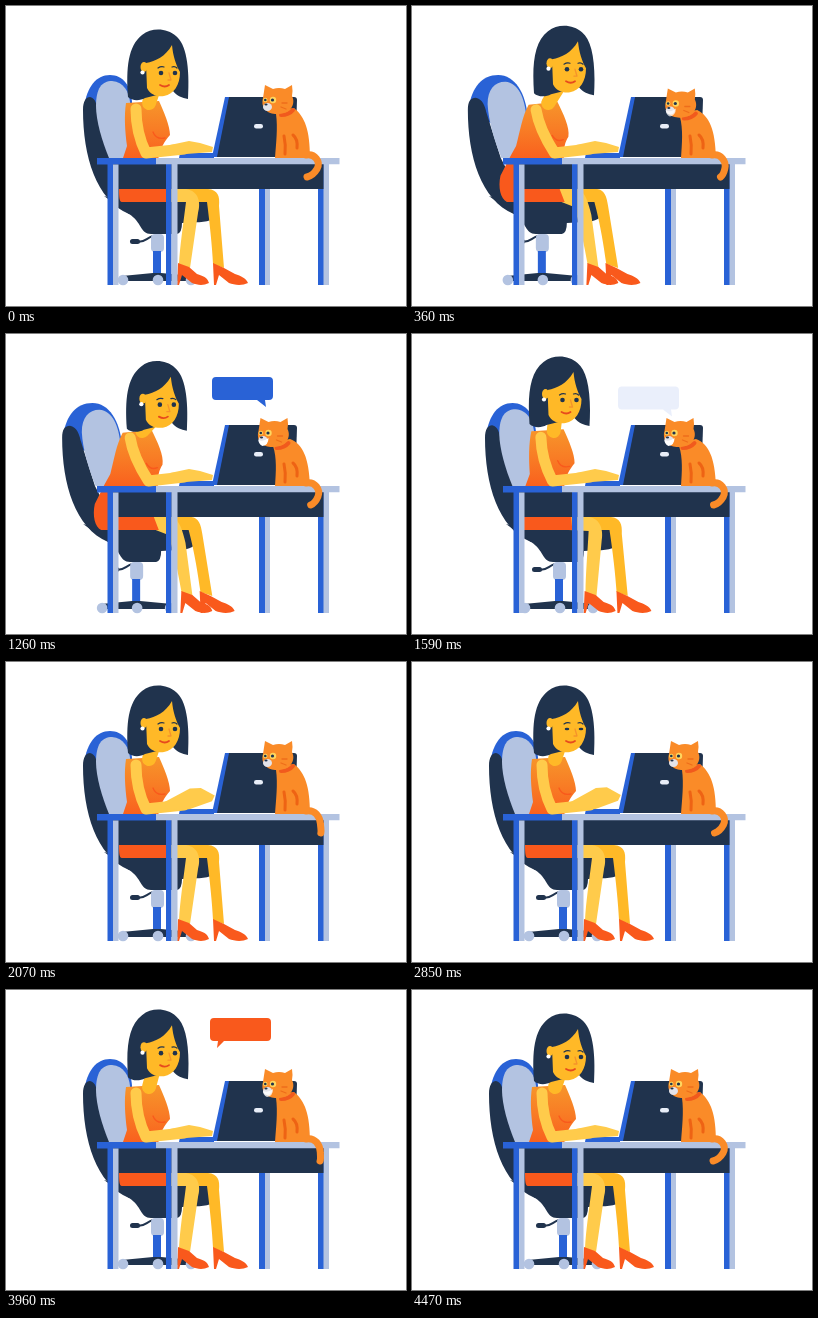
An HTML page that plays this animation: 400x300 px, repeating every 4500 ms.

```html
<!DOCTYPE html>
<html lang="en">
<head>
<meta charset="utf-8">
<title>Desk chat</title>
<style>
html, body { margin: 0; width: 100%; height: 100%; overflow: hidden; background: #fff; }
svg { display: block; width: 400px; height: 300px; }
.navy { fill: #20334d; } .blue { fill: #2962d6; } .pale { fill: #b3c3e1; }
.skin { fill: #ffb927; } .light { fill: #ffcb4b; } .red { fill: #f9591c; } .cat { fill: #fa8b28; }
.line { fill: none; stroke-linecap: round; stroke-linejoin: round; }
</style>
</head>
<body>
<svg viewBox="0 0 400 300">
  <defs>
    <linearGradient id="cloth" gradientUnits="userSpaceOnUse" x1="0" y1="98" x2="0" y2="160">
      <stop offset="0" stop-color="#f7932a"/><stop offset=".4" stop-color="#f87d25"/><stop offset="1" stop-color="#f9591c"/>
    </linearGradient>
  </defs>

  <path id="rim" class="blue"/>
  <path id="back" class="navy"/>
  <path id="pad" class="pale"/>
  <g id="chair">
    <path class="navy" d="M98 190L120 196H206C214 199 214 208 207 213C200 217 188 216 176 217Q176 227 171 228H145C134 228 136 216 123 208Z"/>
    <path class="line" stroke="#20334d" stroke-width="2" d="M130 236C139 237 140 232 147 230"/>
    <rect class="navy" x="124" y="233" width="10" height="5" rx="2.5"/>
    <rect class="pale" x="145" y="228" width="13" height="18" rx="4"/>
    <rect class="blue" x="147" y="245" width="8" height="24"/>
    <path class="navy" d="M116 270L147 267H155L187 270V275H116Z"/>
    <circle class="pale" cx="117" cy="274" r="5.3"/>
    <circle class="pale" cx="152" cy="274" r="5.3"/>
    <circle class="pale" cx="185" cy="274" r="5.3"/>
  </g>

  <path id="farLeg" class="skin"/>
  <path id="farShoe" class="red" d="M207 257L218 262L229 268C235 270 240 272 242 277C236 280 228 279 223 277L213 269L210 279H208Z"/>
  <path id="nearLeg" class="light"/>
  <path id="nearShoe" class="red" d="M172 257L183 261L191 268C197 270 201 271 203 277C197 280 191 279 186 277L176 269L173 279H171Z"/>
  <path id="dress" fill="url(#cloth)"/>
  <path id="bust" class="line" stroke="#f9591c" stroke-width="1.3"/>
  <path id="neck" class="line" stroke="#ffb927" stroke-width="14"/>

  <g id="head">
    <path class="navy" d="M122 91C120 62 122 40 136 29C146 21 161 22 170 30C180 38 184 60 182 93C176 92 171 90 167 85L139 92C134 95 126 95 122 91Z"/>
    <path class="skin" d="M166 39C159 51 150 55 140 57L141 82C144 89 152 91 158 90C168 88 174 79 174 66C170 59 167 50 166 39Z"/>
    <ellipse class="skin" cx="138" cy="61" rx="3.5" ry="5"/>
    <circle cx="136.5" cy="66.5" r="2.1" fill="#fff"/>
    <path class="line" stroke="#20334d" stroke-width="1.2" d="M152 62Q155 60 158 61M166 61Q169 60 171 62"/>
    <path class="line" stroke="#f5932b" stroke-width="1.3" d="M163 67L165 74H162"/>
    <path class="line" stroke="#e74a1d" stroke-width="1.8" d="M154 79Q159 82 163 79"/>
    <ellipse id="eyeL" class="navy" cx="155" cy="67" rx="2.3" ry="2.3"/>
    <ellipse id="eyeR" class="navy" cx="169" cy="67" rx="2.3" ry="2.3"/>
  </g>

  <path class="blue" d="M253 183h6v96h-6zM312 158h6v121h-6z"/>
  <path class="pale" d="M259 183h5v96h-5zM317.5 158h5.5v121h-5.5z"/>
  <path class="navy" d="M106 158H317.5V183H106Z"/>
  <path class="blue" d="M91 152H150V158.5H91ZM101.5 158h5.5v121h-5.5zM160 158h5.5v121h-5.5z"/>
  <path class="pale" d="M150 152H333.5V158.3H150ZM107 158.5h5.5v120.5h-5.5zM165.5 158h6v121h-6z"/>

  <path class="blue" d="M174 147H208V152H173Z"/>
  <path class="navy" d="M221 91H288Q291 91 291 94L289 151H209Z"/>
  <path class="blue" d="M219 91H223L211 151H206Z"/>
  <rect x="248" y="118" width="9" height="4.5" rx="2.2" fill="#e8eef8"/>

  <path id="arm" class="line" stroke="#ffcb4b" stroke-width="11"/>
  <path id="hand" class="light"/>

  <path id="tail" class="line" stroke="#fa8b28" stroke-width="7"/>
  <path id="catBody" class="cat"/>
  <path class="line" stroke="#ee6314" stroke-width="3" d="M278 130Q280 139 279 148M287 129Q292 133 291 142"/>
  <g id="catHead">
    <path class="line" stroke="#f15a1d" stroke-width="4" d="M275 109Q283 109 287 104"/>
    <path class="cat" d="M259 79L267 83Q273 81 279 83L286 79Q287 85 286 90C290 98 285 107 273 108C263 109 254 103 257 92Z"/>
    <path class="line" stroke="#ee6d1b" stroke-width="1.3" d="M276 97H281M275 101L280 103"/>
    <circle cx="259.3" cy="94" r="2.2" fill="#ffd65e"/>
    <circle cx="267" cy="94" r="3.2" fill="#ffd65e"/>
    <circle class="navy" cx="259.3" cy="94" r="1.3"/>
    <circle class="navy" cx="266.5" cy="94" r="1.6"/>
    <ellipse cx="261.5" cy="101" rx="4.5" ry="4" fill="#e4e3e9"/>
    <ellipse class="navy" cx="260" cy="98.5" rx="1.6" ry="1"/>
    <path id="grin" fill="#fff" d="M257 101Q262 103 267 99Q267 106 261 107Q257 105 257 101Z"/>
  </g>

  <path id="catTalk" class="blue" d="M210 43H263Q267 43 267 47V62Q267 66 263 66H259L260 73L251 66H210Q206 66 206 62V47Q206 43 210 43Z"/>
  <path id="herTalk" class="red" d="M208 28H261Q265 28 265 32V47Q265 51 261 51H218L211 58L212 51H208Q204 51 204 47V32Q204 28 208 28Z"/>
</svg>
<script>
const LOOP = 4500;
const $ = id => document.getElementById(id);
const move = (id, x, y) => $(id).setAttribute('transform', `translate(${x} ${y})`);
const shape = (id, d) => $(id).setAttribute('d', d);

// Eased value from a flat list: time, value, time, value...
function key(t, ...k) {
  if (t <= k[0]) return k[1];
  for (let i = 2; i < k.length; i += 2) {
    if (t <= k[i]) {
      const u = (t - k[i - 2]) / (k[i] - k[i - 2]);
      return k[i - 1] + (k[i + 1] - k[i - 1]) * u * u * (3 - 2 * u);
    }
  }
  return k[k.length - 1];
}

// Blend two paths with the same commands.
function blend(a, b, u) {
  const to = b.match(/-?[\d.]+/g);
  let i = 0;
  return a.replace(/-?[\d.]+/g, n => (+n + (to[i++] - n) * u).toFixed(2));
}

// Each part upright at the desk, then leaning back.
const poses = {
  rim: ['M78 101C81 81 90 69 104 69C117 69 125 80 126 96L126 112L86 112Z',
        'M53 101C56 82 66 69 83 69C100 69 112 88 114 115L114 125L62 115Z'],
  back: ['M77 104C77 95 80 91 84 91C90 92 91 100 92 106L104 152L138 205L123 208C90 194 77 150 77 104Z',
         'M52 104C52 95 55 92 60 92C67 93 70 101 71 106L86 152L112 205L98 208C65 194 52 150 52 104Z'],
  pad: ['M90 100C90 82 96 75 106 75C118 76 123 86 124 96L126 152L103 152C96 135 90 115 90 100Z',
        'M73 98C73 84 80 76 91 76C104 77 111 92 113 116L118 152L87 152C80 135 74 115 73 98Z'],
  dress: ['M120 97C118 110 119 125 121 140L117 152L113 180C113 190 113 196 116 196L162 196L162 180L152 150C155 142 158 136 164 129C164 120 158 106 153 95Z',
          'M116 99C109 110 106 125 101 140L95 150L84 168C81 180 84 192 91 196L151 196L144 181L152 150C151 142 152 136 155 131C157 122 150 108 144 96Z'],
  bust: ['M147 126Q150 134 159 132', 'M139 130Q143 137 150 134'],
  nearLeg: ['M158 183L180 183C193 185 195 197 192 207L184 262L173 258C174 240 177 220 180 196L158 196Z',
            'M144 183L163 183C170 186 173 197 177 209L187 262L176 258C172 240 167 222 159 202L148 196Z'],
  farLeg: ['M176 183L202 183C212 184 214 190 213 200L218 262L207 258C206 240 204 220 201 196L176 196Z',
           'M156 183L182 183C189 184 191 190 193 200L204 262L192 258C189 240 186 220 179 196L156 196Z'],
  arm: ['M130 103C130 120 134 135 140 147L178 143', 'M123 104C126 120 135 135 143 147L178 143']
};
const hands = ['M164 139L183 135L194 137L207 141L206 146L180 148L164 149Z',
               'M158 140L184 125L195 124L209 132L206 138L184 147L160 148Z'];
const catBodies = ['M272 104L288 102C299 111 304 124 304 152L269 152C270 138 272 122 270 108Z',
                   'M268 108L284 105C297 110 303 124 304 152L269 152C270 138 271 124 267 112Z'];
const tails = ['M300 149C309 147 315 156 311 163C308 168 305 170 301 171',
               'M300 149C309 147 314 155 315 162C316 167 317 169 317 171'];

function talk(id, t, start, end) {
  $(id).style.opacity = key(t, start, 0, start + 140, 1, end - 160, 1, end, 0);
  move(id, 0, key(t, start, 10, start + 200, 0, end - 220, 0, end, 10));
}

function draw(t) {
  const slide = key(t, 0, 0, 480, 1, 1130, 1, 1590, .16, 1850, 0);
  const hx = key(t, 1100, 0, 1590, -4.5, 1900, 0);
  const hy = key(t, 0, 0, 420, -4, 580, -4, 800, 6, 1050, 6, 1590, -1, 1900, 0, 3600, 0, 3920, -4, 4300, 0);
  const cat = key(t, 150, 0, 480, 1, 1650, 1, 1950, 0);
  const lift = key(t, 1800, 0, 1950, 1, 3000, 1, 3200, 0);
  const type = lift * (.9 + .1 * Math.sin(t / 300 * 2 * Math.PI));
  const eye = key(t, 620, 2.3, 700, .6, 1000, .6, 1080, 2.3, 2550, 2.3, 2650, 1.2, 3000, 1.2, 3100, 2.3);

  move('chair', -25 * slide, 0);
  for (const id in poses) shape(id, blend(...poses[id], slide));
  move('nearShoe', 4 * slide, 0);
  move('farShoe', -16 * slide, 0);
  shape('neck', `M${148 + hx} ${82 + hy}L${143 - 8 * slide} 97`);
  move('head', hx, hy);
  $('eyeL').setAttribute('ry', eye);
  $('eyeR').setAttribute('ry', eye);
  shape('hand', blend(...hands, type));

  shape('catBody', blend(...catBodies, cat));
  move('catHead', -4.5 * cat, 5 * cat);
  $('grin').style.opacity = Math.max(cat, key(t, 3150, 0, 3300, .8, 4000, .8, 4200, 0));
  shape('tail', blend(...tails, .5 - .5 * Math.cos(t / 1500 * 2 * Math.PI)));

  talk('catTalk', t, 480, 1622);
  talk('herTalk', t, 3150, 4300);
}

const begin = performance.now();
function tick() {
  draw((performance.now() - begin) % LOOP);
  requestAnimationFrame(tick);
}
tick();
</script>
</body>
</html>
```
